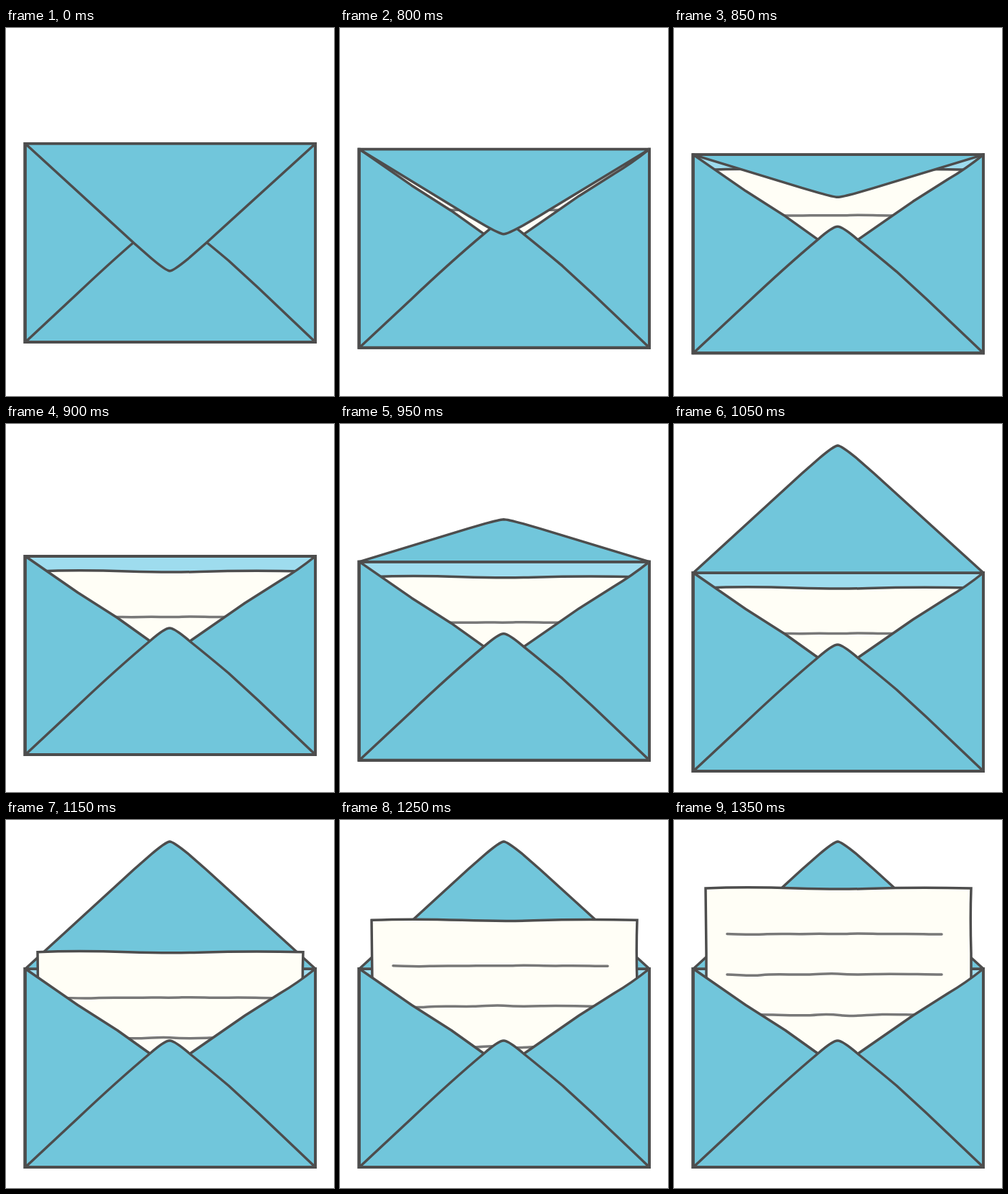
These frames come from a looping animation (457 by 512 pixels, 2.15 s). An HTML page:

```html
<!DOCTYPE html>
<html lang="en">
<head>
<meta charset="utf-8">
<title>Opening envelope</title>
<style>
  html, body { margin: 0; width: 100%; height: 100%; overflow: hidden; background: #fff; }
  svg { display: block; width: 100%; height: 100%; }
  path { stroke: #4d4d4d; stroke-width: 3.5; stroke-linejoin: round; stroke-linecap: round; fill: none; }
  .blue { fill: #71c6db; }
  .inside { fill: #9edcee; stroke-width: 4; stroke-linejoin: miter; }
  .frame { stroke-width: 4; stroke-linejoin: miter; stroke-linecap: square; }
  .paper { fill: #fffef6; stroke-linejoin: miter; }
  .rule { stroke: #787878; }
</style>
</head>
<body>
<svg viewBox="0 0 457 512">
  <g class="body">
    <path class="inside" d="M26.5 0H431V276H26.5Z"/>
    <path class="blue" id="open"/>
  </g>
  <g id="letter">
    <path class="paper" d="M44 0C90 -2 140 -1 170 0S240 1.5 270 .5S350 -1.5 414 0Q412.500 40 414 90V245H45V90Q44.500 40 44 0Z"/>
    <path class="rule" d="M74 63.500C95 64 108 65 125 64S170 64 190 63.500S225 64 245 63.200S285 64 310 63.500S350 64 373 64"/>
    <path class="rule" d="M74 120C90 120 105 122.500 122 120.700S165 120.500 185 120S215 118 228 119S255 120.500 280 119.500S345 120 373 120"/>
    <path class="rule" d="M74 176C100 176 120 175.500 145 176.300S185 177.500 200 176S222 175.500 235 177S270 176 290 175.500S345 177 373 176"/>
  </g>
  <g class="body">
    <path class="blue" d="M27 0L100 50.500L155 85.500L202 119L220 190L27 276Z"/>
    <path class="blue" d="M431 0Q406 20 382 34L333 65L255 119L240 190L431 276Z"/>
    <path class="blue" d="M27 276L100 208Q155 156 201 117.500Q221 100 228 100Q235 100 257 119Q282 139 310 162.500L352 201L431 276Z"/>
    <path class="frame" d="M26.500 0V276H431V0"/>
    <path class="blue" id="shut"/>
  </g>
</svg>
<script>
const LOOP = 2150, START = 800, STEP = 50, STEPS = 12, HALF = 6;
const find = id => document.getElementById(id);
const open = find('open'), shut = find('shut'), letter = find('letter');
const bodies = document.querySelectorAll('.body');

const move = (el, y) => el.setAttribute('transform', `translate(0 ${y.toFixed(2)})`);

// tilt: 1 = folded down, 0 = edge on, -1 = standing up
function flapPath(tilt) {
  const y = v => (v * tilt).toFixed(2);
  return `M27 0L178 ${y(138)}L202 ${y(159)}Q222 ${y(176)} 228 ${y(177)}` +
    `Q233 ${y(177)} 255 ${y(159)}L279 ${y(138)}L431 0Z`;
}

function draw(time) {
  const t = time % LOOP;
  const k = t < START ? 0 : Math.min(STEPS, Math.floor((t - START) / STEP) + 1);
  const drop = Math.min(k, HALF) / HALF;
  const rise = Math.max(k - HALF, 0) / HALF;
  const top = 161 + 46 * drop;
  const tilt = 1 - 2 * drop;
  const [shown, hidden] = tilt > 0 ? [shut, open] : [open, shut];

  bodies.forEach(el => move(el, top));
  move(letter, top + 21 - 133 * rise);
  shown.setAttribute('d', flapPath(tilt));
  hidden.setAttribute('d', '');
}

const begin = performance.now();
function tick(now) {
  draw(Math.max(0, now - begin));
  requestAnimationFrame(tick);
}
draw(0);
requestAnimationFrame(tick);
</script>
</body>
</html>
```
